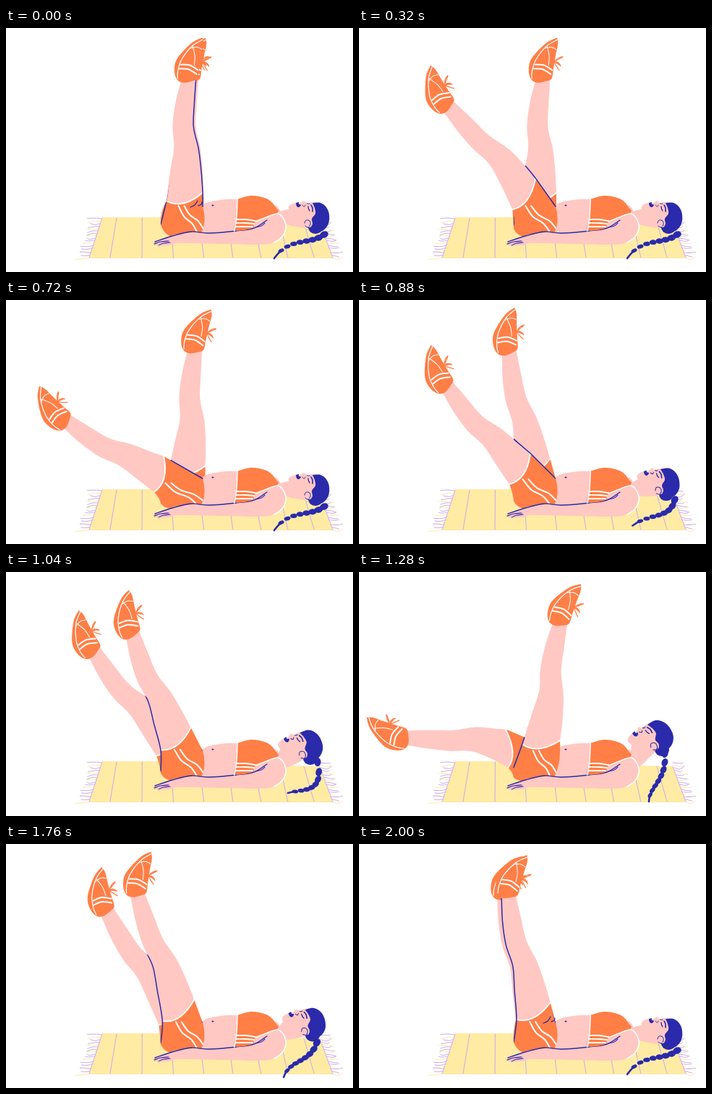
An HTML page with a canvas that plays this animation: 480 by 339 pixels, repeating every 2080 ms.

```html
<!DOCTYPE html>
<html lang="en">
<head>
<meta charset="utf-8">
<title>Leg scissors</title>
<style>
html, body { margin: 0; width: 100%; height: 100%; overflow: hidden; background: #fff; }
canvas { display: block; width: 480px; height: 339px; }
</style>
</head>
<body>
<canvas id="stage"></canvas>
<script>
const LOOP = 2080, STEP = 80;
const ORANGE = '#ff7f47', SKIN = '#ffc8c3', BLUE = '#2a2aab';
const YELLOW = '#ffeba4', LILAC = '#c9a9ee', WHITE = '#fff';
const HIP = { x: 246, y: 262 };

const canvas = document.getElementById('stage');
const g = canvas.getContext('2d');
const dpr = window.devicePixelRatio || 1;
canvas.width = 480 * dpr;
canvas.height = 339 * dpr;
g.scale(dpr, dpr);
g.lineCap = g.lineJoin = 'round';

// Leg keys: time, angle, reach, knee bend, shoe tilt.
const nearTrack = [
  [0, -88, 190, 0, 16], [320, -128.6, 196, 11, 15], [560, -170, 183, 14, 17], [720, -150, 187, 0, 22],
  [1040, -112, 189, 2, 17], [1280, -80.4, 193, 4, 18], [1600, -110, 205, 6, 36], [2000, -101.6, 194, 3, 36]];
const farTrack = [
  [0, -87, 190, 1, 16], [320, -87.5, 190, 1, 16], [720, -85.5, 192, 4, 17], [1040, -129.4, 195, 0, 19],
  [1280, -170, 183, 14, 17], [1600, -134, 201, 5, 19], [2000, -103.5, 193, 2, 36]];

// Head keys: time, ear x, ear y, tilt, then the braid as a cubic curve.
const lying = [418, 272, 0, 440, 287, 420, 302, 392, 290, 371, 320];
const headTrack = [
  [0, ...lying], [720, ...lying],
  [1040, 411, 254, -20, 431, 264, 440, 308, 412, 301, 390, 307],
  [1280, 409, 242, -30, 423, 252, 426, 290, 402, 296, 401, 319],
  [1600, 411, 251, -22, 424, 266, 420, 306, 394, 304, 394, 326],
  [2000, ...lying]];

// Shape of a leg: share of its reach, front width, back width.
const PROFILE = [[1, 10, 10], [0.83, 9, 17], [0.66, 9, 20], [0.5, 17, 17], [0.33, 22, 21]];

const mix = (a, b, p) => a + (b - a) * p;

// Periodic monotone cubic through the keys.
function pose(track, t) {
  const n = track.length;
  const key = i => [track[(i + n) % n][0] + Math.floor(i / n) * LOOP, ...track[(i + n) % n].slice(1)];
  let i = 0;
  while (t >= key(i + 1)[0]) i++;
  const [k0, k1, k2, k3] = [key(i - 1), key(i), key(i + 1), key(i + 2)];
  const span = k2[0] - k1[0], p = (t - k1[0]) / span, q = 1 - p;
  const rate = (a, b, j) => (b[j] - a[j]) / (b[0] - a[0]);
  const slope = (a, b) => a * b > 0 ? 2 * a * b / (a + b) * span : 0;
  return k1.slice(1).map((v, m) => {
    const j = m + 1, d = rate(k1, k2, j);
    const s1 = slope(rate(k0, k1, j), d), s2 = slope(d, rate(k2, k3, j));
    return q * q * (1 + 2 * p) * v + p * p * (3 - 2 * p) * k2[j] + p * q * (q * s1 - p * s2);
  });
}

const pairs = v => v.reduce((r, x, i) => (i % 2 ? r[r.length - 1].push(x) : r.push([x]), r), []);

function spline(path, pts, join) {
  path[join ? 'lineTo' : 'moveTo'](...pts[0]);
  for (let i = 0; i < pts.length - 1; i++) {
    const a = pts[i - 1] || pts[i], b = pts[i], c = pts[i + 1], d = pts[i + 2] || c;
    path.bezierCurveTo(b[0] + (c[0] - a[0]) / 6, b[1] + (c[1] - a[1]) / 6,
      c[0] - (d[0] - b[0]) / 6, c[1] - (d[1] - b[1]) / 6, c[0], c[1]);
  }
  return path;
}

const curve = (...v) => spline(new Path2D(), pairs(v));
function fill(path, color) {
  g.fillStyle = color;
  g.fill(path);
}
function stroke(path, color, width) {
  g.strokeStyle = color;
  g.lineWidth = width;
  g.stroke(path);
}
const shape = (color, ...v) => fill(curve(...v), color);
const line = (color, width, ...v) => stroke(curve(...v), color, width);
function dot(color, x, y, rx, ry = rx, turn = 0) {
  g.fillStyle = color;
  g.beginPath();
  g.ellipse(x, y, rx, ry, turn, 0, 7);
  g.fill();
}

function mat() {
  fill(new Path2D('M133 263H330L392 269L434 270L452 320H115Z'), YELLOW);
  let seed = 7;
  const rnd = () => (seed = seed * 16807 % 2147483647) / 2147483647;
  for (let i = 0; i < 17; i++) {
    const p = i / 16, y = mix(265, 319, p), c = i % 3 === 1 ? YELLOW : LILAC;
    const lx = mix(132, 115, p), rx = mix(434, 452, p);
    line(c, 1, lx, y, lx - 7, y + rnd() * 3 - 1, lx - 11 - rnd() * 9, y + rnd() * 5 - 2);
    line(c, 1, rx, y, rx + 7, y + rnd() * 3, rx + 9 + rnd() * 7, y + rnd() * 5 - 2);
  }
  line(LILAC, 1, 133, 264, 115, 319);
  line(LILAC, 1, 434, 270, 452, 319);
  for (let i = 0; i < 8; i++) {
    const x = 144 + 40 * i + 10 * Math.sin(i * Math.PI / 7.5);
    line(LILAC, 1, x + 9 - 23 * Math.sqrt(i / 7), i > 6 ? 270 : 264, x, 319);
  }
}

function shoe(x, y, angle) {
  g.save();
  g.translate(x, y);
  g.rotate(angle);
  for (const d of [-3, 3]) line(ORANGE, 1.3, 28, 6, 33 + d, 11, 33 + d * 2, 16, 29, 7, 26 + d, 13, 23 + d, 17);
  shape(ORANGE, 62, 0, 54, 4, 38, 6, 19, 9, 6, 11, 0, 5, -6, -6, -4, -16, 7, -23, 24, -24, 50, -12, 62, 0);
  line(WHITE, 1.2, -3, -15, 7, -18, 24, -18, 46, -10, 59, 1);
  for (const d of [11, 17]) line(WHITE, 2, d, -17, d + 3, -5, d, 8);
  line(WHITE, 1, 22, 1, 34, -2, 46, -9);
  line(WHITE, 1, 43, -11, 47, -3, 46, 4);
  g.restore();
}

function buildLeg([angle, reach, bend, tilt]) {
  const a = angle * Math.PI / 180, c = Math.cos(a), s = Math.sin(a);
  const at = (u, w) => {
    const off = w + bend * Math.sin(Math.PI * u), along = u * reach;
    return [HIP.x + along * c - off * s, HIP.y + along * s + off * c];
  };
  const drop = -90 - angle, hemAt = (27 + drop * 0.2) / reach;
  const hemF = at(hemAt + 0.04, 25), hemB = at(hemAt - 0.03, -25), fold = at(hemAt - 0.09, -2);
  const front = [...PROFILE.map(([u, f]) => at(u, f)), hemF];
  const back = [...PROFILE.map(([u, , b]) => at(u, -b)), hemB];
  const seat = [214, 273 + drop * 0.16], lap = [Math.max(272, hemF[0]), 248];

  const skin = spline(new Path2D(), front);
  skin.quadraticCurveTo(...fold, ...hemB);
  spline(skin, [...back].reverse(), true);

  const hem = new Path2D();
  hem.moveTo(...hemB);
  hem.quadraticCurveTo(...fold, ...hemF);
  const shorts = new Path2D(hem);
  shorts.lineTo(...lap);
  shorts.quadraticCurveTo(278, 270, 270, 285);
  shorts.quadraticCurveTo(255, 286, 238, 290);
  shorts.quadraticCurveTo(220, 292, ...seat);
  shorts.quadraticCurveTo(seat[0] - 1, (seat[1] + hemB[1]) / 2, ...hemB);

  const edge = spline(new Path2D(), front);
  edge.lineTo(...lap);
  spline(edge, [...back, seat]);
  const stripe = [mix(fold[0], hemB[0], 0.25), mix(fold[1], hemB[1], 0.25)];
  return { angle, skin, hem, shorts, edge, stripe, ankle: at(1, 0), shoe: a + tilt * Math.PI / 180 };
}

function drawLeg(l) {
  fill(l.skin, SKIN);
  fill(l.shorts, ORANGE);
  g.save();
  g.clip(l.shorts);
  for (const d of [0, 8]) {
    const x = l.stripe[0] + d, y = l.stripe[1] - 2, ex = 265 + d, ey = 285 - d * 0.75;
    line(WHITE, 2, x, y, mix(x, ex, 0.3), mix(y, ey, 0.4), mix(x, ex, 0.72), mix(y, ey, 0.65), ex, ey);
  }
  g.restore();
  stroke(l.hem, WHITE, 1.8);
  shoe(...l.ankle, l.shoe);
}

function torso() {
  shape(SKIN, 266, 252, 277, 243, 300, 238.5, 320, 238, 350, 240, 377, 258, 386, 275, 368, 298, 318, 290, 264, 286);
  dot(BLUE, 286, 246.5, 1.5, 1);
}

function arm() {
  shape(SKIN, 345, 270, 362, 263, 377, 259, 387, 272, 381, 290, 370, 298, 350, 301, 300, 300,
    240, 299, 226, 302, 209, 302, 205, 298, 228, 289, 256, 284, 280, 285, 318, 282, 345, 276);
  line(BLUE, 1.4, 206, 297, 230, 289, 256, 283, 280, 285, 318, 282, 343, 278, 361, 267);
  line(BLUE, 1.2, 345, 277, 353, 275, 358, 271);
  for (const d of [0, 2]) line(BLUE, 1.1, 205 + d * 3, 300 + d, 214 + d * 2, 297 + d, 225 + d, 296 + d);
}

function bra() {
  shape(SKIN, 368, 249, 374, 247, 379, 254, 377, 262);
  shape(ORANGE, 320, 238, 335, 233.5, 350, 234, 364, 239, 373, 249, 375, 257, 345, 270, 341, 278, 317, 281, 318, 265, 320, 238);
  line(WHITE, 1.6, 320, 238, 319, 262, 316, 282);
  for (const d of [0, 5, 10]) line(WHITE, 1.8, 318, 266 + d, 332, 266 + d, 345 - d * 0.4, 268 + d * 0.8);
  line(WHITE, 1.6, 345, 269, 360, 263, 376, 258, 385, 267, 387, 280, 381, 291, 371, 298);
}

function neck([x, y, tilt]) {
  const r = tilt * Math.PI / 180, c = Math.cos(r), s = Math.sin(r);
  const at = (u, v) => [x + u * c - v * s, y + u * s + v * c];
  const nape = at(-1, 5);
  shape(SKIN, 372, 260, 376, 256, ...at(-23, -20), ...at(-3, -8), ...nape,
    mix(nape[0], 386, 0.6), mix(nape[1], 273, 0.6) + 1, 386, 272);
}

// Head coordinates are relative to the ear.
function head([x, y, tilt]) {
  dot(BLUE, x + 10, y + 5, 10, 9);
  g.save();
  g.translate(x, y);
  g.rotate(tilt * Math.PI / 180);
  g.scale(1 - tilt * 0.002, 1 - tilt * 0.002);
  shape(SKIN, -25, -15, -27, -23, -24, -27, -17, -29, -11, -28.5, -6, -32, -2, -29, 4, -30,
    12, -28, 20, -14, 8, 2, -2, 5, -12, 0, -25, -15);
  shape(BLUE, 6, -29, 17, -29, 25, -23, 29, -13, 28, 0, 21, 9, 11, 12, 3, 8, 6, 0, 5, -7, 10, -14, 9, -22, 6, -29);
  dot(SKIN, -1, 0, 4, 5, 0.5);
  line(BLUE, 1, -5, -1, -3, -5, 2, -4, 3, 1, 0, 5, -4, 3);
  shape(BLUE, -17, -29, -13, -30, -13, -27.5, -10, -26, -13, -23, -16, -24.5, -17, -29);
  line(BLUE, 1, -8, -26, -5.5, -24, -4, -26);
  line(BLUE, 1.3, 0, -24, 0.5, -21, 2, -18);
  line(BLUE, 1.6, 4, -26, 6, -22, 6, -17);
  line(BLUE, 1, -1.5, -28.5, 0.5, -27.5, 2, -28);
  g.restore();
}

function braid(k) {
  const at = (u, i) => {
    const v = 1 - u;
    return v * v * v * k[i] + 3 * v * v * u * k[i + 2] + 3 * v * u * u * k[i + 4] + u * u * u * k[i + 6];
  };
  const point = u => [at(u, 3), at(u, 4)];
  for (let i = 0; i < 8; i++) {
    const u = i * 0.122, [x, y] = point(u), [nx, ny] = point(u + 0.02);
    dot(BLUE, x, y, 6 - i * 0.25, 4.6 - i * 0.3, Math.atan2(ny - y, nx - x) + 0.25);
  }
  line(BLUE, 2.6, ...point(0.84), ...point(0.92), ...point(1));
}

function draw(t) {
  g.fillStyle = WHITE;
  g.fillRect(0, 0, 480, 339);
  const h = pose(headTrack, t);
  const far = buildLeg(pose(farTrack, t)), near = buildLeg(pose(nearTrack, t));
  mat();
  drawLeg(far);
  torso();
  drawLeg(near);

  // Near leg contour shows only where it crosses the far leg.
  const both = new Path2D(far.skin);
  both.addPath(far.shorts);
  g.save();
  g.clip(both);
  stroke(near.edge, BLUE, 1.5);
  g.restore();
  if (Math.abs(near.angle - far.angle) < 6) {
    line(BLUE, 1.3, 255, 249, 261, 246, 265, 240);
    line(BLUE, 1.3, 266, 247, 270, 245, 271, 242);
  }

  neck(h);
  arm();
  bra();
  head(h);
  braid(h);
}

function tick(now) {
  draw(Math.floor(now % LOOP / STEP) * STEP);
  requestAnimationFrame(tick);
}
draw(0);
requestAnimationFrame(tick);
</script>
</body>
</html>
```
